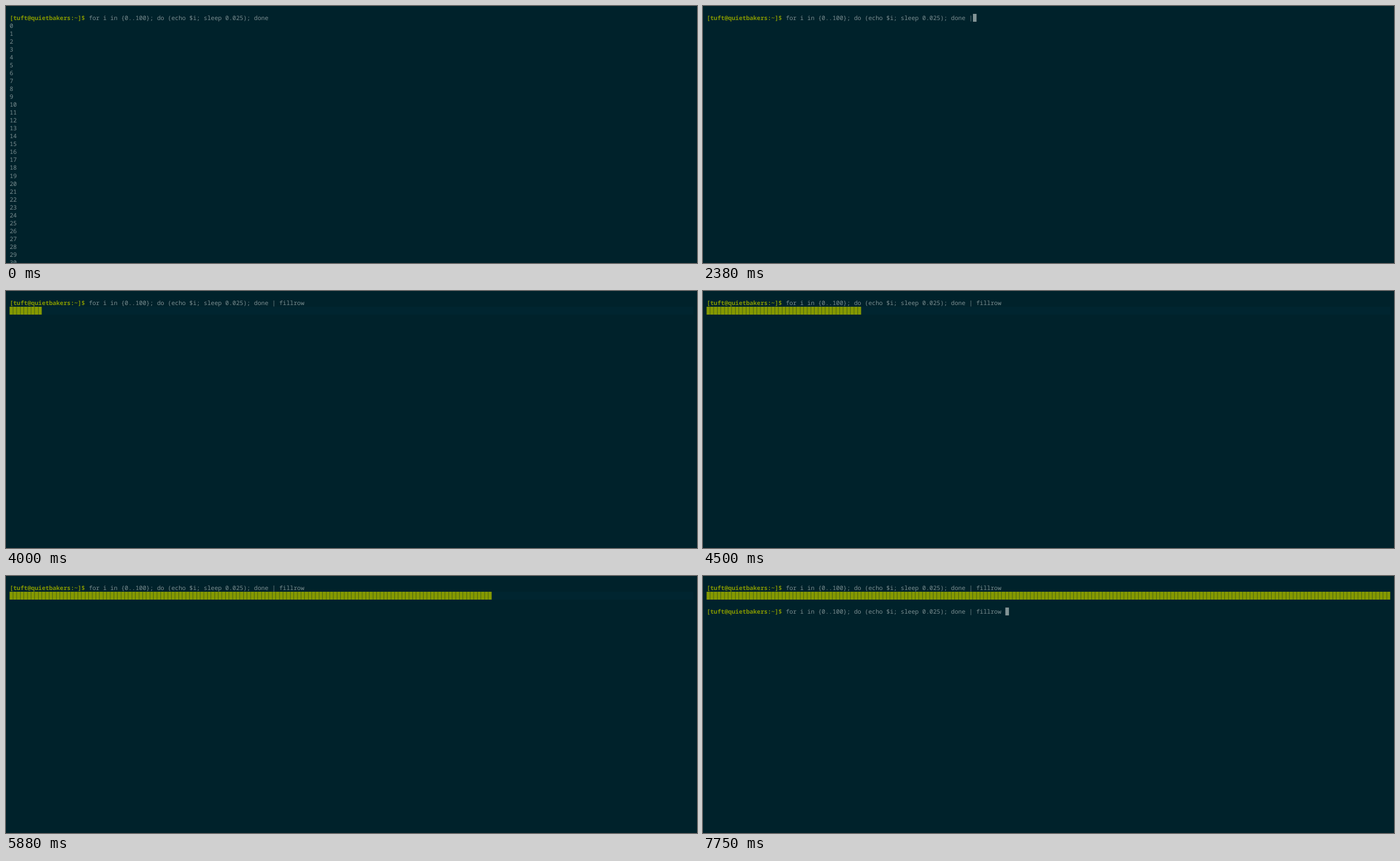
These frames come from a looping animation (1226x457 px, 8000 ms). An HTML page:

```html
<!DOCTYPE html>
<html lang="en">
<head>
<meta charset="utf-8">
<title>Terminal</title>
<style>
  html, body { margin: 0; width: 100%; height: 100%; overflow: hidden; background: #00222b; }
  svg { display: block; width: 1226px; height: 457px; }
  text {
    font: 10.643px "Noto Sans Mono", "DejaVu Sans Mono", monospace;
    white-space: pre;
    text-rendering: geometricPrecision;
    fill: #7b8e91;
  }
  .prompt { font-weight: 700; fill: #859900; }
</style>
</head>
<body>
<svg viewBox="0 0 1226 457">
  <rect id="track" fill="#002530"/>
  <path id="bar" fill="#859900"/>
  <g id="lines"></g>
  <rect id="cursor" fill="#839496"/>
</svg>
<script>
const LOOP = 8000;
const CELL = 6.386;
const ROW = 14.03;
const COLS = 190;
const PROMPT = "[tuft@quietbakers:~]$";
const START = PROMPT.length + 1;
const LOOP_CMD = "for i in {0..100}; do (echo $i; sleep 0.025); done";
const FULL_CMD = LOOP_CMD + " | fillrow";

// Each key press: time and number of characters on the first line.
const KEYS = [
  [130, 0], [1380, 50], [1630, 51], [2380, 52], [2630, 53], [2750, 54],
  [3000, 55], [3130, 56], [3250, 57], [3500, 58], [3630, 59], [3750, 60]
];
const CLEAR = 130, ENTER = 3880, DONE = 6880, RECALL = 7500, SPACE = 7750;
const COUNT_START = 3845, COUNT_STEP = 28.4;

const byId = id => document.getElementById(id);
const lines = byId("lines"), bar = byId("bar"), track = byId("track"), cursor = byId("cursor");

const colX = col => CELL * (col + 1);
const rowY = row => 14 + ROW * row;

function setRect(el, x, y, width, height) {
  Object.entries({ x, y, width, height }).forEach(([name, value]) => el.setAttribute(name, value));
}

function addText(row, col, content, className = "") {
  const el = document.createElementNS("http://www.w3.org/2000/svg", "text");
  el.setAttribute("x", colX(col));
  el.setAttribute("y", rowY(row) + 10.9);
  el.setAttribute("class", className);
  el.textContent = content;
  lines.append(el);
}

function addCommand(row, command) {
  addText(row, 0, PROMPT, "prompt");
  if (command) addText(row, START, command);
}

function showCursor(row, col) {
  setRect(cursor, colX(col), rowY(row), CELL, 14);
}

// The screen refreshes eight times a second, on 10 ms stamps.
function refreshTime(t) {
  const stamp = k => Math.ceil(k * 12.5) * 10;
  const k = Math.floor(t / 125);
  return stamp(k) > t ? stamp(k - 1) : stamp(k);
}

function drawBar(time) {
  const count = Math.min(100, Math.floor((time - COUNT_START) / COUNT_STEP));
  const cells = Math.floor(count * COLS / 100);
  let d = "";
  for (let i = 0; i < cells; i++) {
    d += `M${colX(i).toFixed(2)} 28.1h${CELL - 0.45}v13.8h${0.45 - CELL}z`;
  }
  bar.setAttribute("d", d);
  setRect(track, CELL, 28, CELL * COLS, 14);
}

function render(time) {
  lines.replaceChildren();
  bar.setAttribute("d", "");
  setRect(track, 0, 0, 0, 0);
  setRect(cursor, 0, 0, 0, 0);

  if (time < CLEAR) {
    addCommand(0, LOOP_CMD);
    for (let n = 0; n <= 30; n++) addText(n + 1, 0, String(n));
  } else if (time < ENTER) {
    const typed = KEYS.filter(([at]) => at <= time).pop()[1];
    addCommand(0, FULL_CMD.slice(0, typed));
    showCursor(0, START + typed);
  } else {
    addCommand(0, FULL_CMD);
    drawBar(time);
    if (time >= DONE) {
      const command = time < RECALL ? "" : time < SPACE ? FULL_CMD : FULL_CMD + " ";
      addCommand(3, command);
      showCursor(3, START + command.length);
    }
  }
}

let shown = -1;
function tick() {
  const time = refreshTime(performance.now() % LOOP);
  if (time !== shown) render(shown = time);
  requestAnimationFrame(tick);
}
tick();
</script>
</body>
</html>
```
